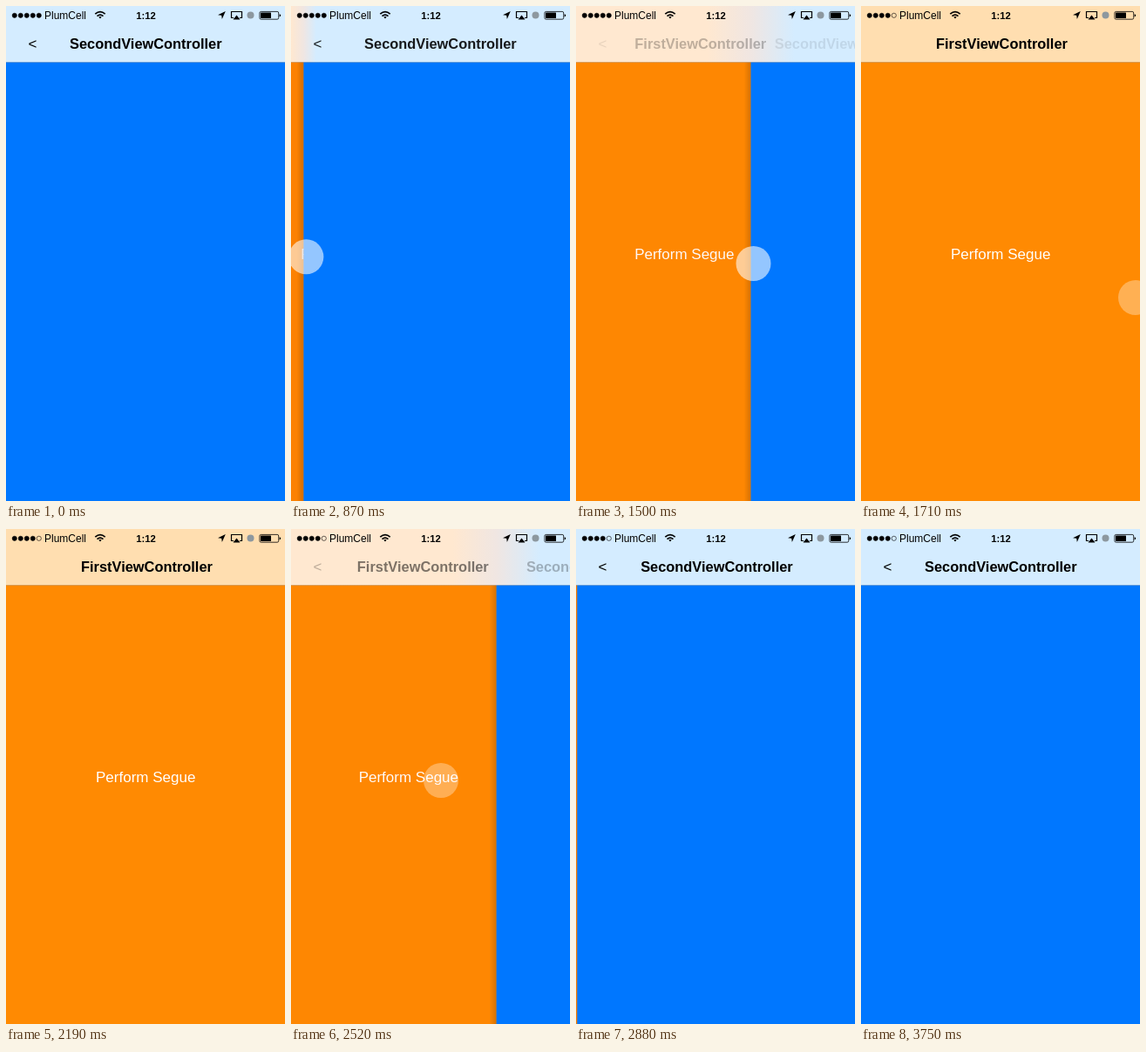
Animation, 320 px wide and 567 px high, one loop 3780 ms. Source, as an HTML page:

```html
<!DOCTYPE html>
<html lang="en">
<head>
<meta charset="utf-8">
<title>Swipe back navigation</title>
<style>
  html, body { margin: 0; width: 100%; height: 100%; overflow: hidden; background: #0077ff; }
  svg { display: block; width: 320px; height: 567px; font-family: "Liberation Sans", Arial, sans-serif; }
  .title { font-size: 16.4px; font-weight: bold; }
  .status { font-size: 12px; }
  .clock { font-size: 11.3px; font-weight: bold; }
</style>
</head>
<body>
<svg viewBox="0 0 320 567">
  <defs>
    <linearGradient id="tint" gradientUnits="userSpaceOnUse" x1="0" x2="1" y1="0" y2="0">
      <stop offset="0" stop-color="#ffe8d0"/>
      <stop offset=".5" stop-color="#f0e6e2"/>
      <stop offset="1" stop-color="#d4ecff"/>
    </linearGradient>
    <linearGradient id="edge">
      <stop offset="0" stop-opacity="0"/>
      <stop offset="1" stop-opacity=".16"/>
    </linearGradient>
  </defs>

  <rect width="320" height="567" fill="#ff8a02"/>
  <text id="label" x="103" y="290" font-size="17" fill="#fff">Perform Segue</text>
  <rect id="dim" width="320" height="567" fill="#d83000"/>
  <g id="second">
    <rect id="shadow" x="-8" width="8" height="567" fill="url(#edge)"/>
    <rect width="320" height="567" fill="#0077ff"/>
  </g>

  <rect id="bar" width="320" height="64.5"/>
  <rect y="64" width="320" height=".5" opacity=".3"/>
  <text id="back" x="25.5" y="49" font-size="17">&lt;</text>
  <text id="title1" class="title" x="86" y="48.5">FirstViewController</text>
  <text id="title2" class="title" x="73" y="48.5">SecondViewController</text>

  <g id="dots" stroke="#000" stroke-width=".6"></g>
  <text class="status" x="44" y="15">PlumCell</text>
  <g fill="none" stroke="#000" stroke-width="1.7">
    <path d="M102.3 9.2Q108 4.2 113.7 9.2M104.5 11.6Q108 8.6 111.5 11.6"/>
    <path d="M106.3 12.6Q108 11.2 109.7 12.6L108 14.6Z" fill="#000" stroke="none"/>
  </g>
  <text class="clock" x="160.5" y="15" text-anchor="middle">1:12</text>
  <path d="M251.8 6L247.8 15L247.2 10.8L243 10.2Z"/>
  <path d="M261 13.5H258.5V6.5H270.5V13.5H268" fill="none" stroke="#000" stroke-width="1.2"/>
  <path d="M264.5 10.5L268.5 15.5H260.5Z"/>
  <circle cx="280.5" cy="10.5" r="4" fill="#8d989f"/>
  <rect x="290.9" y="6.4" width="21.8" height="8.8" rx="1.6" fill="none" stroke="#000" stroke-width=".8"/>
  <rect x="292" y="7.5" width="12" height="6.6" rx=".5"/>
  <path d="M313.6 9.2Q315.2 9.4 315.2 10.8T313.6 12.4Z"/>

  <circle id="touch" r="20" fill="#fff"/>
</svg>
<script>
const LOOP = 3780, STEP = 30, WIDTH = 320;
const RELEASE = 1640, POPPED = 1700, PUSH = 2466, PUSHED = 2966;
const el = id => document.getElementById(id);
const set = (node, attrs) => {
  for (const key in attrs) node.setAttribute(key, attrs[key]);
};

// Rows of [time, value...], linear between rows
function track(rows, t) {
  if (t <= rows[0][0]) return rows[0].slice(1);
  for (let i = 1; i < rows.length; i++) {
    const a = rows[i - 1], b = rows[i];
    if (t <= b[0]) {
      const k = (t - a[0]) / (b[0] - a[0]);
      return a.slice(1).map((v, j) => v + (b[j + 1] - v) * k);
    }
  }
  return rows[rows.length - 1].slice(1);
}

// x, y, opacity
const swipe = [
  [660, 3, 289, 0], [720, 3, 289, .58], [800, 9, 288, .58], [900, 21, 287, .58],
  [1000, 40, 287, .58], [1100, 63, 287, .58], [1230, 99.5, 288, .58],
  [1500, 203.5, 295, .58], [1600, 250, 308, .58], [1650, 281, 319, .58],
  [1710, 315, 334, .32], [1800, 317, 336, 0]
];
const tap = [
  [2310, 172, 288, 0], [2360, 172, 288, .58], [2460, 172, 288, .58],
  [2520, 172, 288, .32], [2610, 172, 288, 0]
];

const spring = ms => {
  const u = .0185 * Math.max(0, ms);
  return (1 + u) * Math.exp(-u);
};

// Share of the first screen shown, for the views and for the bar
function progress(t) {
  if (t < POPPED) {
    const at = Math.min(t, RELEASE);
    const x = track(swipe, at)[0] - 3;
    const k = Math.max(0, t - RELEASE) / (POPPED - RELEASE);
    const p = (x + (WIDTH - x) * k) / WIDTH;
    return [p, p];
  }
  if (t >= PUSHED) return [0, 0];
  return [spring(t - PUSH), spring(t - PUSH - 9)];
}

const dots = Array.from({ length: 5 }, (_, i) => {
  const dot = document.createElementNS("http://www.w3.org/2000/svg", "circle");
  set(dot, { cx: 9.8 + i * 7, cy: 10.8, r: 2.6 });
  el("dots").append(dot);
  return dot;
});

function draw(t) {
  const [p, q] = progress(t);
  const x = p * WIDTH;
  const moving = p > .005 && p < 1;

  set(el("second"), { transform: `translate(${x} 0)` });
  set(el("shadow"), { opacity: moving ? Math.min(1, (1 - p) * 4) : 0 });
  set(el("label"), { x: 103 - .3 * (WIDTH - x) });
  set(el("dim"), { opacity: .1 * (1 - p) });

  const blur = Math.min(50, x, WIDTH - x);
  set(el("tint"), { x1: x - blur, x2: x + blur });
  set(el("bar"), { fill: moving ? "url(#tint)" : p === 1 ? "#ffdeb0" : "#d4ecff" });

  const fade = (1 - q) ** (t >= PUSH ? .85 : 2.5);
  set(el("title1"), { x: 86 - 50 * (1 - q), opacity: q ** 3 });
  set(el("title2"), { x: 73 + 247 * q, opacity: fade });
  set(el("back"), { opacity: fade });

  const [cx, cy, opacity] = track(t < 2000 ? swipe : tap, t);
  set(el("touch"), { cx, cy, opacity });
  set(dots[4], { fill: t < 1680 ? "#000" : "none" });
}

const start = performance.now();
function tick() {
  const t = (performance.now() - start) % LOOP;
  draw(Math.floor(t / STEP) * STEP);
  requestAnimationFrame(tick);
}
tick();
</script>
</body>
</html>
```
